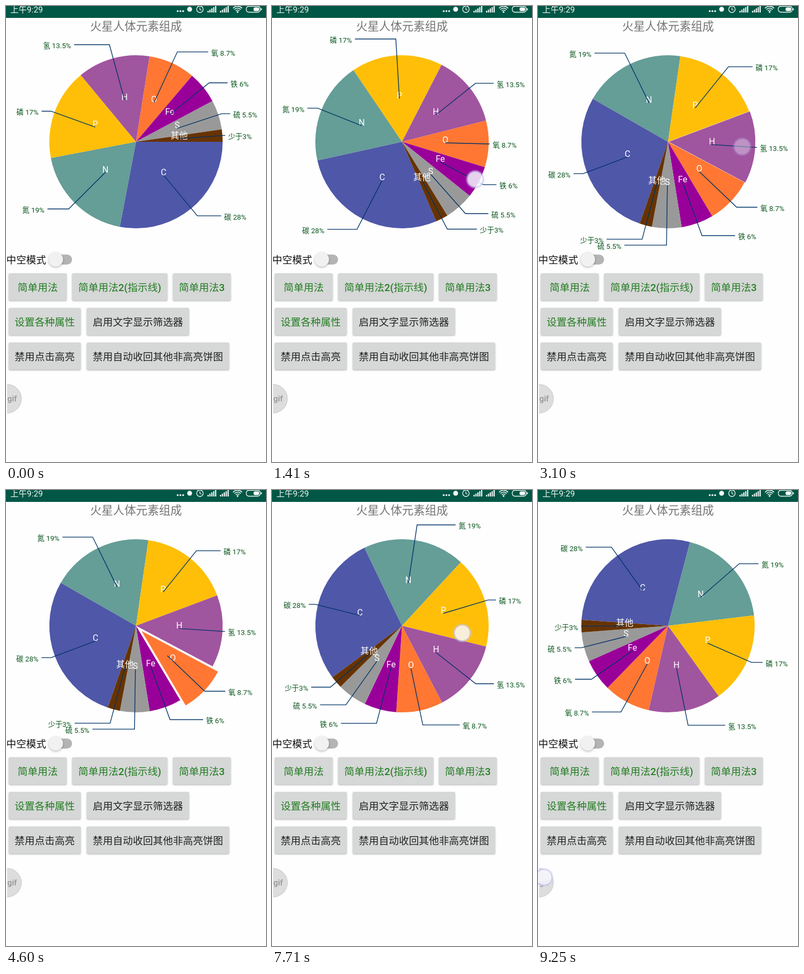
Recreate the animation shown at these times as an HTML page with a canvas. Size 480 px wide and 843 px high, loop 9.35 s.

```html
<!DOCTYPE html>
<html lang="zh">
<head>
<meta charset="utf-8">
<style>
html, body { margin: 0; width: 100%; height: 100%; overflow: hidden; background: #fefefe; }
canvas { display: block; width: 480px; height: 843px; }
</style>
</head>
<body>
<canvas id="stage"></canvas>
<script>
const W = 480, H = 843, LOOP = 9350;
const CX = 240, CY = 251, R = 160, LIFT = 14, RAD = Math.PI / 180;
const FONT = 'Roboto, "Noto Sans CJK SC", "Noto Sans CJK", sans-serif';

const canvas = document.getElementById('stage');
const ctx = canvas.getContext('2d');
const dpr = window.devicePixelRatio || 1;
canvas.width = W * dpr;
canvas.height = H * dpr;

// rise: lift-up start/end, fall: retract start/end
const slices = [
  { pct: 28, sign: 'C', label: '碳 28%', color: '#4f57a8' },
  { pct: 19, sign: 'N', label: '氮 19%', color: '#659d97', rise: [5280, 5740], fall: [6520, 7000] },
  { pct: 17, sign: 'P', label: '磷 17%', color: '#ffbf08' },
  { pct: 13.5, sign: 'H', label: '氢 13.5%', color: '#a0559f', rise: [3050, 3320], fall: [4120, 4620] },
  { pct: 8.7, sign: 'O', label: '氧 8.7%', color: '#ff7733', rise: [4120, 4620], fall: [5280, 5740] },
  { pct: 6, sign: 'Fe', label: '铁 6%', color: '#990099' },
  { pct: 5.5, sign: 'S', label: '硫 5.5%', color: '#999999' },
  { pct: 2.3, sign: '其他', label: '少于3%', color: '#663300' }
];

const spin = [[0, 0], [520, 0], [1410, 66.7], [1870, 91.8], [2430, 109],
  [7600, 109], [7710, 143.4], [8400, 183.9], [LOOP, 183.9]];

// drags: keys of angle and distance around the pie centre
const drags = [
  { from: 480, to: 2520, end: 2640,
    angle: [[480, -46], [1410, 27.1], [1870, 52.5], [2430, 68.4]],
    dist: [[480, 150], [1410, 152], [1870, 176.5], [2430, 205]] },
  { from: 7510, to: 8330, end: 8450,
    angle: [[7510, -44.1], [7710, 6.7], [8400, 46.6]],
    dist: [[7510, 116], [7710, 112], [8400, 125]] }
];
const taps = [
  { from: 2860, to: 3020, end: 3150, x: 377, y: 260 },
  { from: 3970, to: 4110, end: 4240, x: 330, y: 340 },
  { from: 5200, to: 5300, end: 5430, x: 190, y: 140 },
  { from: 6350, to: 6480, end: 6610, x: 190, y: 140 },
  { from: 9250, to: 9400, end: 9500, x: 11, y: 716 }
];

const clamp = x => Math.max(0, Math.min(1, x));

function ramp(t, span) {
  if (!span) return 0;
  const x = clamp((t - span[0]) / (span[1] - span[0]));
  return x * x * (3 - 2 * x);
}

// Monotone cubic curve through [time, value] keys
function curve(keys, t) {
  const n = keys.length - 1;
  if (t <= keys[0][0]) return keys[0][1];
  if (t >= keys[n][0]) return keys[n][1];
  const slope = i => (keys[i + 1][1] - keys[i][1]) / (keys[i + 1][0] - keys[i][0]);
  const tangent = i => {
    if (i === 0) return slope(0);
    if (i === n) return slope(n - 1);
    const a = slope(i - 1), b = slope(i);
    return a * b <= 0 ? 0 : 2 * a * b / (a + b);
  };
  let i = 0;
  while (t > keys[i + 1][0]) i++;
  const [t0, v0] = keys[i], [t1, v1] = keys[i + 1];
  const h = t1 - t0, u = (t - t0) / h, w = 1 - u;
  return v0 * w * w * (1 + 2 * u) + v1 * u * u * (3 - 2 * u) +
    h * u * w * (tangent(i) * w - tangent(i + 1) * u);
}

function text(str, x, cy, size, color, align = 'left', weight = 400) {
  ctx.font = `${weight} ${size}px ${FONT}`;
  ctx.textAlign = align;
  ctx.fillStyle = color;
  ctx.fillText(str, x, cy + size * 0.36);
}

function disc(x, y, r, color) {
  ctx.beginPath();
  ctx.arc(x, y, r, 0, 2 * Math.PI);
  ctx.fillStyle = color;
  ctx.fill();
}

function box(x, y, w, h, r, color) {
  ctx.beginPath();
  ctx.roundRect(x, y, w, h, r);
  ctx.fillStyle = color;
  ctx.fill();
}

function line(points, color, width) {
  ctx.beginPath();
  points.forEach(([x, y]) => ctx.lineTo(x, y));
  ctx.strokeStyle = color;
  ctx.lineWidth = width;
  ctx.stroke();
}

function ring(x, y, r, a0, a1, color, width) {
  ctx.beginPath();
  ctx.arc(x, y, r, a0, a1);
  ctx.strokeStyle = color;
  ctx.lineWidth = width;
  ctx.stroke();
}

function shadow(blur, dy) {
  ctx.shadowColor = 'rgba(0,0,0,.28)';
  ctx.shadowBlur = blur * dpr;
  ctx.shadowOffsetY = dy * dpr;
}

function statusBar() {
  const white = '#f4faf8';
  box(0, 0, W, 22, 0, '#005746');
  text('上午9:29', 8, 6.3, 15.3, white);
  [317, 322, 327].forEach(x => disc(x, 9.5, 1.7, white));
  disc(339, 6, 4.5, white);
  ring(358, 6, 6, 0, 2 * Math.PI, white, 1.3);
  line([[358, 2.5], [358, 6.5], [361, 7.5]], white, 1.2);
  for (const x0 of [372, 395])
    for (let i = 0; i < 5; i++) {
      const h = 3 + i * 2.3;
      box(x0 + i * 3.5, 12 - h, 2.2, h, 0, white);
    }
  [4.5, 8, 11.5].forEach(r => ring(427.5, 12, r, -Math.PI * 0.76, -Math.PI * 0.24, white, 1.6));
  disc(427.5, 11, 1.7, white);
  ctx.beginPath();
  ctx.roundRect(443.5, 0.5, 26, 11, 5);
  ctx.lineWidth = 1.3;
  ctx.stroke();
  box(457, 2.5, 10.5, 7, 3, white);
  box(470.5, 4, 1.8, 4, 1, white);
}

function controls() {
  const green = '#227d22', black = '#222222';
  text('中空模式', 0.5, 469, 18.4, '#111111');
  box(84, 459.5, 38, 18.5, 9.25, '#b4b4b4');
  ctx.save();
  shadow(4, 1.5);
  disc(92, 468.5, 13.2, '#f1f1f1');
  ctx.restore();
  const buttons = [
    [5, 494, 107, '简单用法', green], [122, 494, 176, '简单用法2(指示线)', green],
    [308, 494, 107, '简单用法3', green],
    [5, 558, 133, '设置各种属性', green], [149, 558, 189, '启用文字显示筛选器', black],
    [5, 622, 133, '禁用点击高亮', black], [149, 622, 263, '禁用自动收回其他非高亮饼图', black]
  ];
  for (const [x, y, w, name, color] of buttons) {
    ctx.save();
    shadow(3, 1.5);
    box(x, y, w, 50, 2.5, '#d6d7d7');
    ctx.restore();
    text(name, x + w / 2, y + 26, 18.5, color, 'center', 500);
  }
}

function floatButton() {
  ctx.save();
  ctx.beginPath();
  ctx.rect(2, 690, 40, 70);
  ctx.clip();
  disc(2, 726, 27, '#c9c9c9');
  disc(2, 726, 26, '#dddddd');
  ctx.restore();
  text('gif', 2.5, 725.5, 15, '#969696', 'left', 500);
}

function pie(t) {
  let a = curve(spin, t);
  const parts = slices.map(s => {
    const start = a, mid = a + s.pct * 1.8;
    a += s.pct * 3.6;
    const lift = LIFT * (ramp(t, s.rise) - ramp(t, s.fall));
    const c = Math.cos(mid * RAD), n = Math.sin(mid * RAD);
    return { s, start, end: a, c, n, x: CX + lift * c, y: CY + lift * n };
  });
  for (const p of parts) {
    ctx.beginPath();
    ctx.moveTo(p.x, p.y);
    ctx.arc(p.x, p.y, R, p.start * RAD, p.end * RAD);
    ctx.closePath();
    ctx.fillStyle = p.s.color;
    ctx.fill();
  }
  for (const p of parts) {
    text(p.s.sign, p.x + p.c * R / 2, p.y + p.n * R / 2 - 5.76, 16, '#ffffff', 'center');
    guide(p);
  }
}

// Leader line: steeper slices get a longer reach and a longer tail
function guide({ s, c, n }) {
  const steep = Math.asin(Math.min(1, Math.abs(n))) / (Math.PI / 2);
  const reach = R + 31.5 * steep, side = c < 0 ? -1 : 1;
  const bx = CX + reach * c, by = CY + reach * n;
  const ex = bx + side * 78.5 * steep;
  line([[CX + c * R / 2, CY + n * R / 2], [bx, by], [ex, by]], '#003366', 1.35);
  text(s.label, ex + side * 5.5, by + 2.2, 13.2, '#08551c', side < 0 ? 'right' : 'left');
}

function finger(x, y, alpha) {
  ctx.save();
  ctx.globalAlpha = alpha;
  const halo = ctx.createRadialGradient(x, y, 13, x, y, 19);
  halo.addColorStop(0, 'rgba(205,205,250,.5)');
  halo.addColorStop(1, 'rgba(205,205,250,0)');
  disc(x, y, 19, halo);
  disc(x, y, 14, 'rgba(255,255,255,.7)');
  ring(x, y, 15, 0, 2 * Math.PI, 'rgba(190,195,240,.6)', 2.2);
  ctx.restore();
}

function touches(t) {
  for (const k of [...drags, ...taps]) {
    if (t < k.from || t >= k.end) continue;
    let { x, y } = k;
    if (k.angle) {
      const a = curve(k.angle, t) * RAD, d = curve(k.dist, t);
      x = CX + d * Math.cos(a);
      y = CY + d * Math.sin(a);
    }
    finger(x, y, 1 - clamp((t - k.to) / (k.end - k.to)));
  }
}

function draw(now) {
  const t = now % LOOP;
  ctx.setTransform(dpr, 0, 0, dpr, 0, 0);
  box(0, 0, W, H, 0, '#fefefe');
  statusBar();
  text('火星人体元素组成', CX, 37.3, 21.2, '#757575', 'center');
  pie(t);
  controls();
  floatButton();
  touches(t);
}

const begin = performance.now();
function tick() {
  draw(performance.now() - begin);
  requestAnimationFrame(tick);
}
tick();
</script>
</body>
</html>
```
